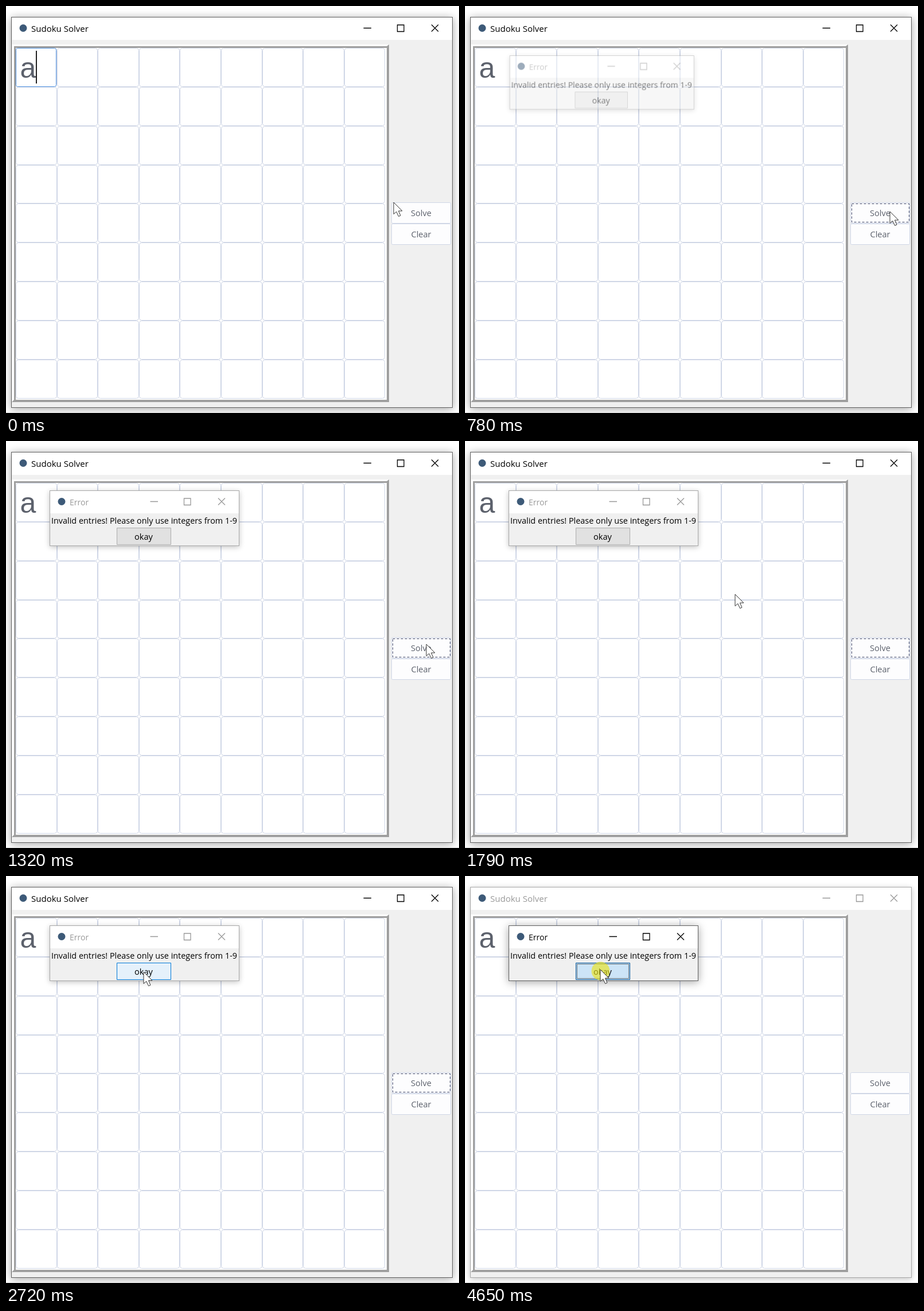
Animation of 790 by 709 pixels, one loop 4.74 s. Source, as an HTML page with a canvas:

```html
<!DOCTYPE html>
<html lang="en">
<head>
<meta charset="utf-8">
<title>Sudoku Solver</title>
<style>
html, body { margin: 0; width: 100%; height: 100%; overflow: hidden; background: #fff; }
canvas { display: block; }
</style>
</head>
<body>
<canvas id="stage" width="790" height="709"></canvas>
<script>
const LOOP = 4740, W = 790, H = 709;
const SANS = '"Open Sans", "Noto Sans", sans-serif';
const INK = '#5c616c', LINE = '#cfd6e6', FACE = '#f0f0f0';
const stage = document.getElementById('stage').getContext('2d');
const layer = Object.assign(document.createElement('canvas'), { width: W, height: H });
const layerCtx = layer.getContext('2d');
let g = stage;

// Pointer moves: start, end, steps, target x, target y, easing
const easeIn = p => p * p;
const easeOut = p => 1 - (1 - p) ** 2;
const moves = [
  [100, 310, 4, 738, 356, easeOut],
  [540, 630, 2, 741, 358, easeOut],
  [780, 1090, 5, 738, 356, easeIn],
  [1320, 1790, 7, 471, 267, easeIn],
  [1870, 2120, 4, 246, 171, easeOut],
  [2490, 2800, 5, 239, 166, easeOut],
  [3110, 3260, 3, 236, 163, easeOut],
];

function pointerAt(t) {
  let x = 676, y = 342;
  for (const [start, end, steps, tx, ty, ease] of moves) {
    if (t < start) break;
    const step = Math.floor((t - start) / (end - start) * (steps - 1) + 0.01);
    const p = ease(Math.min(1, (step + 1) / steps));
    x += (tx - x) * p;
    y += (ty - y) * p;
  }
  return [Math.round(x), Math.round(y)];
}

function fill(x, y, w, h, color) {
  g.fillStyle = color;
  g.fillRect(x, y, w, h);
}

function box(x, y, w, h, r, face, edge) {
  g.beginPath();
  g.roundRect(x + 0.5, y + 0.5, w - 1, h - 1, r);
  g.fillStyle = face;
  g.fill();
  g.strokeStyle = edge;
  g.lineWidth = 1;
  g.stroke();
}

function text(s, x, y, size, color, align = 'left', font = SANS) {
  g.font = `${size}px ${font}`;
  g.textAlign = align;
  g.fillStyle = color;
  g.fillText(s, x, y);
}

function dashed(x, y, w, h, dash, color) {
  g.setLineDash(dash);
  g.strokeStyle = color;
  g.lineWidth = 1;
  g.strokeRect(x + 0.5, y + 0.5, w - 1, h - 1);
  g.setLineDash([]);
}

function disc(x, y, r, color) {
  g.beginPath();
  g.arc(x, y, r, 0, 7);
  g.fillStyle = color;
  g.fill();
}

function drawWindow(x, y, w, h, title, size, active) {
  const ink = active ? '#000' : '#999', r = x + w, cy = y + 19.5;
  g.save();
  g.shadowColor = active ? 'rgba(0,0,0,.36)' : 'rgba(0,0,0,.24)';
  g.shadowBlur = active ? 14 : 9;
  g.shadowOffsetY = 2;
  fill(x, y, w, h, FACE);
  g.restore();
  fill(x, y, w, 40, '#fff');
  g.strokeStyle = active ? '#606060' : '#a8a8a8';
  g.lineWidth = 1;
  g.strokeRect(x + 0.5, y + 0.5, w - 1, h - 1);
  disc(x + 21, cy, 6.5, '#3d5a78');
  text(title, x + 35, y + 26, size, ink);
  g.strokeStyle = ink;
  g.lineWidth = 1.3;
  g.beginPath();
  g.moveTo(r - 155.5, cy); g.lineTo(r - 142, cy);
  g.rect(r - 96.5, cy - 5.5, 11.5, 11.5);
  g.moveTo(r - 37, cy - 6); g.lineTo(r - 25, cy + 6);
  g.moveTo(r - 25, cy - 6); g.lineTo(r - 37, cy + 6);
  g.stroke();
}

function drawGrid(focused) {
  fill(10, 67, 658, 623, '#9f9f9f');
  g.fillStyle = '#fff';
  g.beginPath();
  g.moveTo(10, 690); g.lineTo(10, 67); g.lineTo(668, 67);
  g.lineTo(664, 70); g.lineTo(14, 70); g.lineTo(14, 686);
  g.fill();
  fill(17, 73, 647, 613, '#fff');
  const col = i => Math.round(17 + 71.6 * i), row = j => Math.round(73 + 67.85 * j);
  for (let j = 0; j < 9; j++)
    for (let i = 0; i < 9; i++)
      box(col(i), row(j), col(i + 1) - col(i), row(j + 1) - row(j), 4, '#fff', LINE);
  if (focused) box(17, 73, 71, 68, 3, '#fff', '#5294e2');
  text('a', 24.5, 124.5, 50, INK, 'left', '"Liberation Sans", Arial, sans-serif');
}

function drawButton(label, y, focused) {
  box(672, y, 104, 37, 2, '#fdfdfe', LINE);
  text(label, 724, y + 24, 14.6, INK, 'center');
  if (focused) dashed(674, y + 2, 101, 33, [4, 3], '#3f4668');
}

function drawDialog(active, hover) {
  drawWindow(76, 86, 331, 97, 'Error', 14, active);
  text('Invalid entries! Please only use integers from 1-9', 79, 143.5, 14.4, '#000');
  const [face, edge] = active ? ['#cce4f7', '#005499']
    : hover ? ['#e5f1fb', '#0078d7'] : ['#e1e1e1', '#adadad'];
  box(193, 151, 95, 30, 0, face, edge);
  if (active) dashed(195, 153, 91, 26, [1, 1], '#000');
  text('okay', 240, 171.5, 14.6, '#000', 'center');
}

function drawPointer(x, y) {
  g.beginPath();
  for (const [dx, dy] of [[0, 0], [0, 20.5], [4.8, 16.3], [8.6, 24.5], [12, 23], [8.5, 15], [15, 15]])
    g.lineTo(x + dx, y + dy);
  g.closePath();
  g.fillStyle = '#fff';
  g.fill();
  g.strokeStyle = '#333';
  g.lineWidth = 1;
  g.stroke();
}

function draw(t) {
  const [px, py] = pointerAt(t);
  const okPressed = t >= 4650, solvePressed = t >= 540 && t < 630;
  g = stage;
  fill(0, 0, W, H, '#fff');
  drawWindow(9, 19, 770, 681, 'Sudoku Solver', 15, !okPressed);
  fill(0, 708, W, 1, '#d8d8d8');
  drawGrid(t < 540);
  if (t < 100) fill(52, 78, 2, 57, '#222');
  drawButton('Solve', 342, t >= 540 && !okPressed);
  drawButton('Clear', 379, false);

  if (t >= 780) {
    const step = Math.min(4, Math.floor((t - 780) / 77.5 + 0.01));
    const scale = 1 - 0.027 * (1 - step / 4) ** 3;
    g = layerCtx;
    g.clearRect(0, 0, W, H);
    drawDialog(okPressed, px > 192 && px < 288 && py > 150 && py < 182);
    g = stage;
    g.save();
    g.globalAlpha = 1 - 0.5 * (1 - step / 4) ** 2;
    g.translate(76 + 60 * (1 - scale), 86);
    g.scale(scale, scale);
    g.drawImage(layer, -76, -86);
    g.restore();
  }
  if (solvePressed || okPressed) disc(px + 0.5, py + 2.5, 16, 'rgba(238,230,20,.62)');
  drawPointer(px, py);
}

const start = performance.now();
function tick() {
  draw((performance.now() - start) % LOOP);
  requestAnimationFrame(tick);
}
tick();
</script>
</body>
</html>
```
